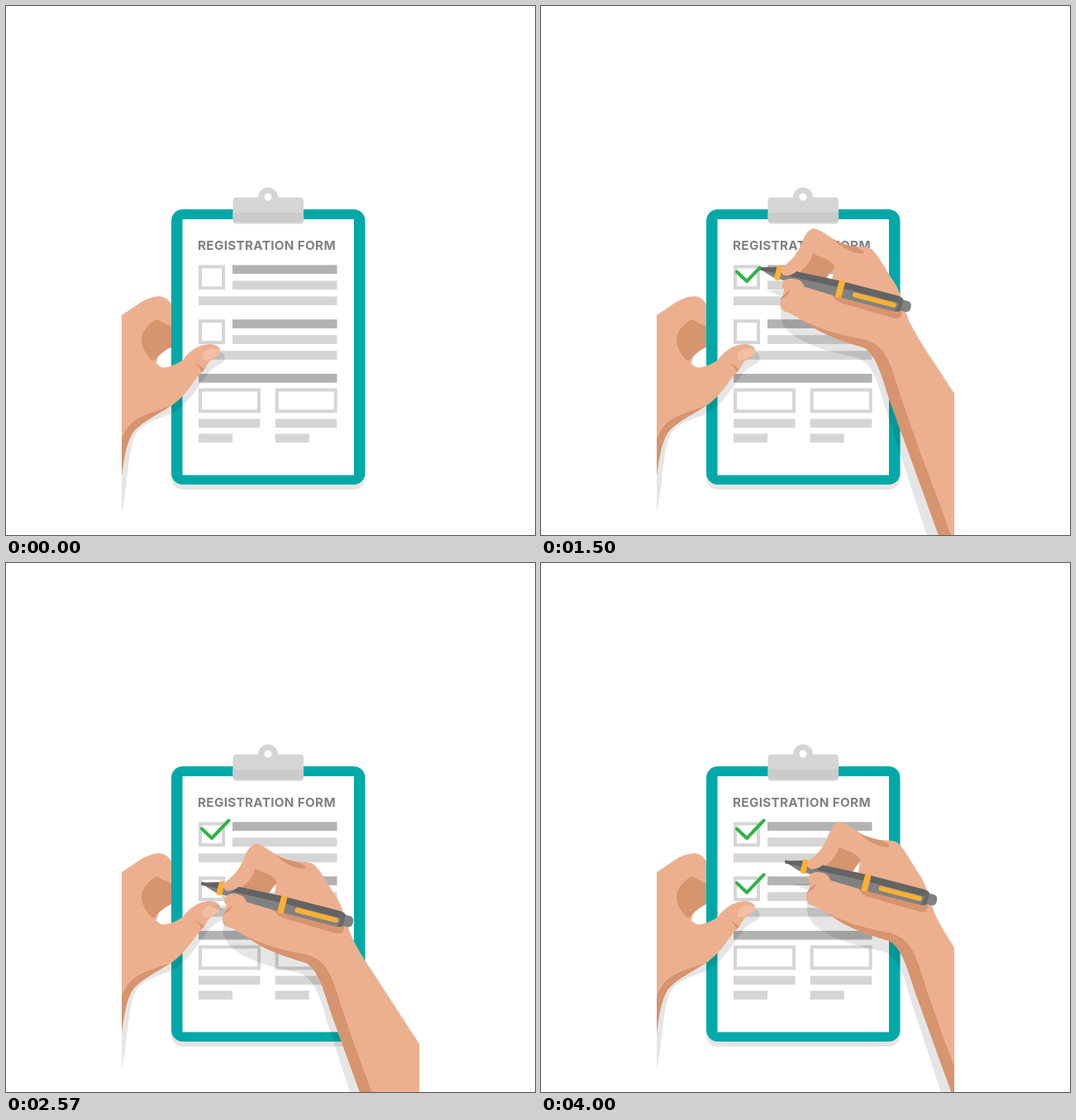
An HTML page for the animation above (4.57 s loop, 640x640 px).

```html
<!DOCTYPE html>
<html lang="en">
<head>
<meta charset="utf-8">
<title>Registration form</title>
<style>
  html, body { margin: 0; width: 100%; height: 100%; overflow: hidden; background: #fff; }
  svg { display: block; width: 100vw; height: 100vh; }
  .skin { fill: #ecb08f; }
  .shade { fill: #d6946f; }
  .cast { fill: #000; fill-opacity: .1; }
  .lite { fill: #d5d5d5; }
  .dark { fill: #b2b2b2; }
  .box { fill: #fff; stroke: #d5d5d5; stroke-width: 4; }
  .tick { fill: none; stroke: #2fb344; stroke-width: 4; stroke-linecap: round; stroke-linejoin: round; }
  .gold { fill: #fbb034; }
  text { font: 700 15.2px Inter, "Open Sans", sans-serif; letter-spacing: .36px; fill: #808080; }
</style>
</head>
<body>
<svg viewBox="0 0 640 640">
  <defs>
    <clipPath id="stage"><rect x="140" y="0" width="360" height="640"/></clipPath>
  </defs>

  <g clip-path="url(#stage)">
    <!-- fingers behind the board -->
    <path class="skin" d="M140 374 L158 362 C168 355 179 350.500 187 351.500 C194 352.500 198 357 201 362 V389 L190 400 L182 432 L160 440 H140 Z"/>
    <path class="shade" d="M182 379 L201 388.500 V412.500 C193 415 186 422 178 430 C169 422 164 413 164 403 C165 392 173 385 182 379 Z"/>

    <!-- clipboard -->
    <rect class="cast" x="200" y="252" width="234.500" height="333" rx="14"/>
    <rect x="200" y="246" width="234.500" height="333" rx="14" fill="#00a9a8"/>
    <rect x="213.500" y="258" width="207.500" height="309.500" fill="#fff"/>
    <path class="lite" fill-rule="evenodd" d="M279 231.500 H305 A12 12 0 1 1 329 231.500 H355.500 Q360 231.500 360 236 V259 Q360 263.500 355.500 263.500 H279 Q274.500 263.500 274.500 259 V236 Q274.500 231.500 279 231.500 Z M312.500 231 A4.500 4.500 0 1 0 321.500 231 A4.500 4.500 0 1 0 312.500 231 Z"/>
    <path d="M274.500 250 H360 V258 Q360 261.500 356 261.500 H278.500 Q274.500 261.500 274.500 258 Z" fill="#cbcbcb"/>
    <text x="232" y="294.800">REGISTRATION FORM</text>
    <g id="form"></g>

    <!-- left hand -->
    <path class="cast" d="M215 432 L258 417 C267 422 267 430 258 434 C248 438 243 447 236 456 C224 474 213 487 198 494 C180 501 164 506 157 518 C147 538 148 575 140 614 V500 Z"/>
    <path class="skin" d="M140 428 L178 429 C183 434 187 437 191 437.500 C201 436 209 432 214 428 C222 418 231 410 246 409 C257 409 262 416 257 422 C254 426 249 427 246 430 C242 435 241 440 235 445 C226 455 217 472 201 483 C185 490 165 497 153 509 C144 522 143 545 140 568 Z"/>
    <path class="shade" d="M201 483 C185 489 170 493 158 500 C149 506 144 514 140 524 V568 C143 549 145 530 153 517 C161 505 184 494 201 483 Z"/>
    <path d="M237 421 C243 414 252 412 258.500 417 C260 421 255 425 249 426 C245 428 242 430 239 428 C236 426 240 423 237 421 Z" fill="#f1bfa3"/>
    <path class="shade" d="M229 433 C233 434 237 437 240 440 L236 443 C236 439 233 436 229 433 Z"/>

    <!-- right hand -->
    <g id="hand">
      <path class="cast" d="M248 351 L272 350 L300 370 L400 400 L560 640 V720 H468 L439 640 L389 487 C381 456 373 438 356 432 C330 427 296 418 278 404 C264 392 262 380 267 368 L270 360 Z"/>
      <path class="skin" fill-rule="evenodd" d="M304 276 C315 277 328 292 346 296 C356 299 366 297 373 300 C382 306 392 327 402 341 C412 357 414 378 424 396 C432 411 441 425 452 441 L500 515 L632 720 H482 L453 640 L395 480 C386 452 380 429 365 420 C340 413 315 404 298 392 C286 384 278 379 270 376 C262 373 263 364 267 358 L272 332 C262 334 263 326 270 321 C281 312 287 302 291 291 C294 283 299 277 304 276 Z M301 331 L316 336 L329 324 L326 341 L300 338 Z"/>
      <path class="shade" d="M303 306 C311 311 323 311 330 322 L319 337 L284 331 C293 325 301 317 303 306 Z"/>
      <path class="shade" d="M329 290 C338 300 354 307 364 306 C367 304 361 300 352 297.500 C343 296 335 293 329 290 Z"/>
      <path class="shade" d="M285 384 C309 397 337 405 360 409 C384 413 393 427 401 452 C419 510 441 566 468 640 L497 720 H482 L453 640 L395 480 C386 452 380 429 365 420 C340 413 315 404 298 392 Z"/>
      <g transform="translate(238 323.500) rotate(14.500)">
        <path class="shade" d="M92 6 H180 Q184 18 173 18 L106 16 Q96 14 92 6 Z"/>
        <path d="M1 -1.800 H5 L19 -6 L100 -9.500 H170 Q178 -9.500 179 -6.500 H184 Q190 -6.500 190 0 V1 Q190 7 184 7 H179 Q177 10 170 10 H100 L19 6.500 L5 2 H1 Q-1 0 1 -1.800 Z" fill="#818181"/>
        <path d="M1 -1.800 H5 L19 -6 L100 -9.500 H170 Q178 -9.500 178 -1.500 H100 L20 1 L5 2 H1 Q-1 0 1 -1.800 Z" fill="#636363"/>
        <path d="M172 -4 Q177 0 172 9.500 Q178 9 179 7 V-6 Q177 -9 172 -9 Z" fill="#686868"/>
        <path class="gold" d="M21 -7.500 Q24.500 -10 28 -7.500 V8 Q24.500 10 21 8 Z M98 -10 Q101.500 -11.500 105.500 -10 V10.500 Q101.500 12 98 10.500 Z"/>
        <rect class="gold" x="118" y="-.500" width="54" height="6" rx="3"/>
      </g>
      <path class="skin" d="M291 292 C286 305 279 314 269 321 C263 326 264 332 271 333 C280 333 284 327 290 322 C298 316 302 312 303 306 Z"/>
      <path class="skin" d="M266 345 C266 337 275 335 283 337 C291 339 295 346 292 352 C300 358 308 362 313 369 L297 388 C285 379 276 378 268 376 C261 370 264 361 272 354 C274 351 266 350 266 345 Z"/>
      <path class="shade" d="M264 363 C267 356 272 354 276 350 C275 356 270 358 264 363 Z"/>
    </g>
    <polyline class="tick" id="tick0"/>
    <polyline class="tick" id="tick1"/>
  </g>
</svg>
<script>
const LOOP = 4570, STEPS = 64;
const $ = id => document.getElementById(id);

// form rows
const rect = (cls, x, y, w, h) => `<rect class="${cls}" x="${x}" y="${y}" width="${w}" height="${h}"/>`;
const bar = (x, y, w, cls = 'lite') => rect(cls, x, y, w, 10.7);
const box = (x, y, w) => rect('box', x + 2, y + 2, w - 4, 25.8);
const item = y => box(233, y, 32) + bar(274, y, 126.5, 'dark') + bar(274, y + 19, 126.5) + bar(233, y + 38, 167.5);
const field = x => box(x, 462.5, 75) + bar(x, 499.5, 74.5) + bar(x, 517.5, 41);
$('form').innerHTML = item(313.4) + item(379.2) + bar(233, 445, 167.5, 'dark') + field(233) + field(325.7);

// pen route
const tick = dy => [[237, 321.5 + dy], [249, 333 + dy], [269.5, 311.5 + dy]];
const ticks = [tick(0), tick(65.7)];
const ease = p => (1 - Math.cos(Math.PI * p)) / 2;
const moves = [
  { a: 0, b: 12.4, pts: [[505, 412], ticks[0][0]], f: ease },
  { a: 12.4, b: 22.6, pts: ticks[0] },
  { a: 24, b: 35, pts: [ticks[0][2], ticks[1][0]], f: ease },
  { a: 39.4, b: 49.7, pts: ticks[1] },
  { a: 50, b: 56, pts: [ticks[1][2], [296, 361]], f: ease }
];

const progress = (m, n) => {
  const p = Math.min(1, Math.max(0, (n - m.a) / (m.b - m.a)));
  return m.f ? m.f(p) : p;
};

// the first part p of a polyline
function part(pts, p) {
  const lens = pts.slice(1).map((q, i) => Math.hypot(q[0] - pts[i][0], q[1] - pts[i][1]));
  let left = p * lens.reduce((s, l) => s + l, 0);
  const out = [pts[0]];
  for (let i = 0; i < lens.length; i++) {
    const k = Math.min(1, left / lens[i]);
    out.push([0, 1].map(j => pts[i][j] + (pts[i + 1][j] - pts[i][j]) * k));
    left -= lens[i];
    if (left <= 0) break;
  }
  return out;
}

function draw(t) {
  const n = Math.floor((t + 5) / (LOOP / STEPS)) % STEPS;
  const move = moves.filter(m => m.a <= n).pop();
  const [x, y] = part(move.pts, progress(move, n)).pop();
  $('hand').setAttribute('transform', `translate(${x - 239} ${y - 323.4})`);
  [moves[1], moves[3]].forEach((m, i) => {
    const p = progress(m, n);
    $('tick' + i).setAttribute('points', p > 0 ? part(m.pts, p).join(' ') : '');
  });
}

const start = performance.now();
function loop() {
  draw((performance.now() - start) % LOOP);
  requestAnimationFrame(loop);
}
draw(0);
requestAnimationFrame(loop);
</script>
</body>
</html>
```
